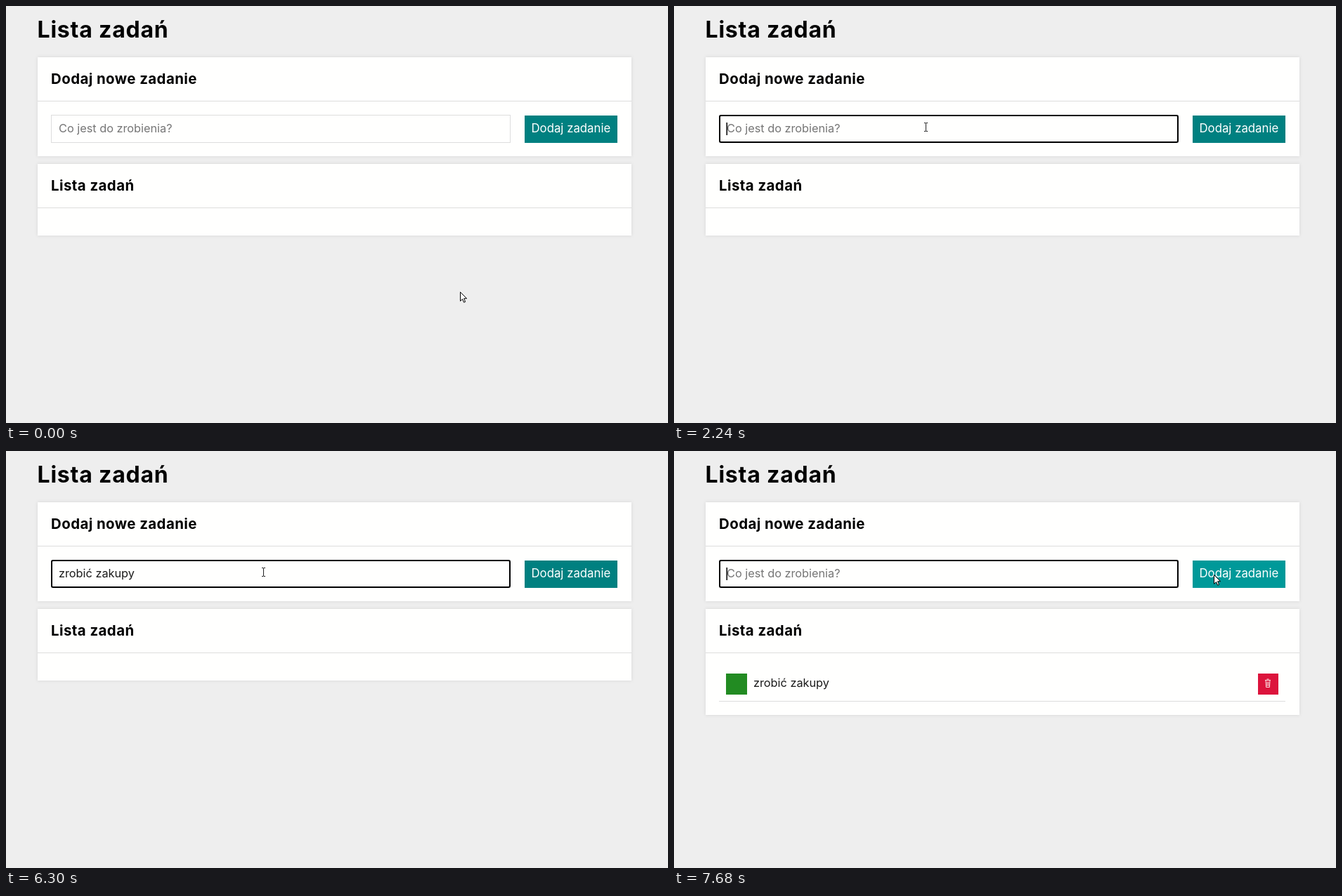
Recreate the animation shown at these times as an HTML page. Size 942 by 594 pixels, loop 8000 ms.

```html
<!DOCTYPE html>
<html lang="pl">
<head>
<meta charset="utf-8">
<title>Lista zadań</title>
<style>
  html, body { margin: 0; width: 100%; height: 100%; overflow: hidden; background: #eee; }
  svg { display: block; width: 942px; height: 594px; }
  text { font: 400 16.3px Inter, "Open Sans", sans-serif; fill: #1a1a1a; white-space: pre; }
  .h1 { font-size: 32px; font-weight: 700; letter-spacing: .8px; fill: #000; }
  .h2 { font-size: 20.4px; font-weight: 700; letter-spacing: .45px; fill: #000; }
  .card { fill: #fffffe; filter: drop-shadow(0 0 2px #d4d4d4); }
  .line { fill: #ddd; }
</style>
</head>
<body>
<svg viewBox="0 0 942 594">
  <rect width="942" height="594" fill="#eee"/>
  <text class="h1" x="44.5" y="45">Lista zadań</text>

  <rect class="card" x="45" y="73" width="845" height="141"/>
  <text class="h2" x="64" y="111">Dodaj nowe zadanie</text>
  <rect class="line" x="45" y="135" width="845" height="1"/>
  <rect id="field" x="64.5" y="155.5" width="653" height="39" fill="#fffffe" stroke="#ddd"/>
  <rect id="ring" x="65" y="156" width="652" height="38" rx="2" fill="#fffffe" stroke="#000" stroke-width="2"/>
  <text id="hint" x="75" y="180" style="fill:#757575">Co jest do zrobienia?</text>
  <text id="typed" x="75" y="180"></text>
  <rect id="caret" y="166" width="1.5" height="18"/>
  <rect id="button" x="738" y="156" width="132" height="39"/>
  <text x="747.5" y="180" style="fill:#fff;font-size:16.8px">Dodaj zadanie</text>

  <rect class="card" id="list" x="45" y="225" width="845" height="102"/>
  <text class="h2" x="64" y="262.5">Lista zadań</text>
  <rect class="line" x="45" y="287" width="845" height="1"/>
  <g id="item">
    <rect x="74" y="317" width="30" height="30" fill="#228b22"/>
    <text x="113" y="336">zrobić zakupy</text>
    <rect x="831" y="317" width="29" height="30" fill="#dc143c"/>
    <path d="M841 326.5h8M843.5 325h3M842 327l.6 9.5h4.8l.6-9.5M844 328.5v6.5M846 328.5v6.5" fill="none" stroke="#fbdfe0"/>
    <rect class="line" x="64" y="356" width="806" height="1"/>
  </g>

  <path id="arrow" d="M.5.5v12.8l3-2.8 2.1 4.7 2-.9-2-4.6h4z" fill="#fff" stroke="#000"/>
  <path id="beam" d="M-2.5-6h2l.5.5.5-.5h2M0-5.5V5.5M-2.5 6h2l.5-.5.5.5h2" fill="none" stroke="#222"/>
</svg>
<script>
const LOOP = 8000, TASK = 'zrobić zakupy';
const FOCUS = 1000, PRESS = 7560, ADD = 7680, HOVER = 7070;
const keys = [2350, 2560, 2690, 3020, 3220, 3630, 3830, 4030, 4230, 4360, 4560, 4960, 5310];
// the caret switches between on and off at each of these times
const blinks = [1070, 1690, 2240, 5840, 6370, 6900, 7400, PRESS, ADD];
// pointer stops: time, x, y
const stops = [[0, 646, 407], [510, 368, 190], [780, 358, 172], [6230, 358, 172], [7070, 747, 174], [7400, 768, 176]];

const $ = id => document.getElementById(id);
const [ring, hint, typed, caret, button, list, item, arrow, beam] =
  ['ring', 'hint', 'typed', 'caret', 'button', 'list', 'item', 'arrow', 'beam'].map($);

const show = (el, on) => el.setAttribute('visibility', on ? 'visible' : 'hidden');
const passed = (times, t) => times.filter(v => v <= t).length;
const smooth = p => p * p * (3 - 2 * p);
const easeOut = p => 1 - (1 - p) ** 2;

function pointerAt(t) {
  const i = stops.findIndex(s => s[0] > t);
  if (i < 0) return stops[stops.length - 1].slice(1);
  const [t0, x0, y0] = stops[i - 1], [t1, x1, y1] = stops[i];
  const p = (t - t0) / (t1 - t0);
  const e = i === 2 || i === 5 ? easeOut(p) : smooth(p);
  return [x0 + (x1 - x0) * e, y0 + (y1 - y0) * e].map(Math.round);
}

function drawPointer(t) {
  const [x, y] = pointerAt(t);
  const overField = x >= 64 && x < 718 && y >= 155 && y < 195;
  show(beam, overField);
  show(arrow, !overField);
  beam.setAttribute('transform', `translate(${x + .5} ${y + .5})`);
  arrow.setAttribute('transform', `translate(${x} ${y})`);
}

function draw(t) {
  const added = t >= ADD;
  const text = added ? '' : TASK.slice(0, passed(keys, t));
  if (typed.textContent !== text) typed.textContent = text;
  show(hint, !text);
  show(ring, t >= FOCUS && t < PRESS || added);
  show(caret, passed(blinks, t) % 2);
  caret.setAttribute('x', 74.5 + (text ? typed.getComputedTextLength() : 0));

  const glow = smooth(Math.min(1, Math.max(0, (t - HOVER) / 300)));
  const tone = Math.round(128 + 25 * glow);
  button.setAttribute('fill', `rgb(0,${tone},${tone})`);

  list.setAttribute('height', added ? 151 : 102);
  show(item, added);
  drawPointer(t);
}

const start = performance.now();
function tick(now) {
  draw(Math.max(0, now - start) % LOOP);
  requestAnimationFrame(tick);
}
draw(0);
requestAnimationFrame(tick);
</script>
</body>
</html>
```
